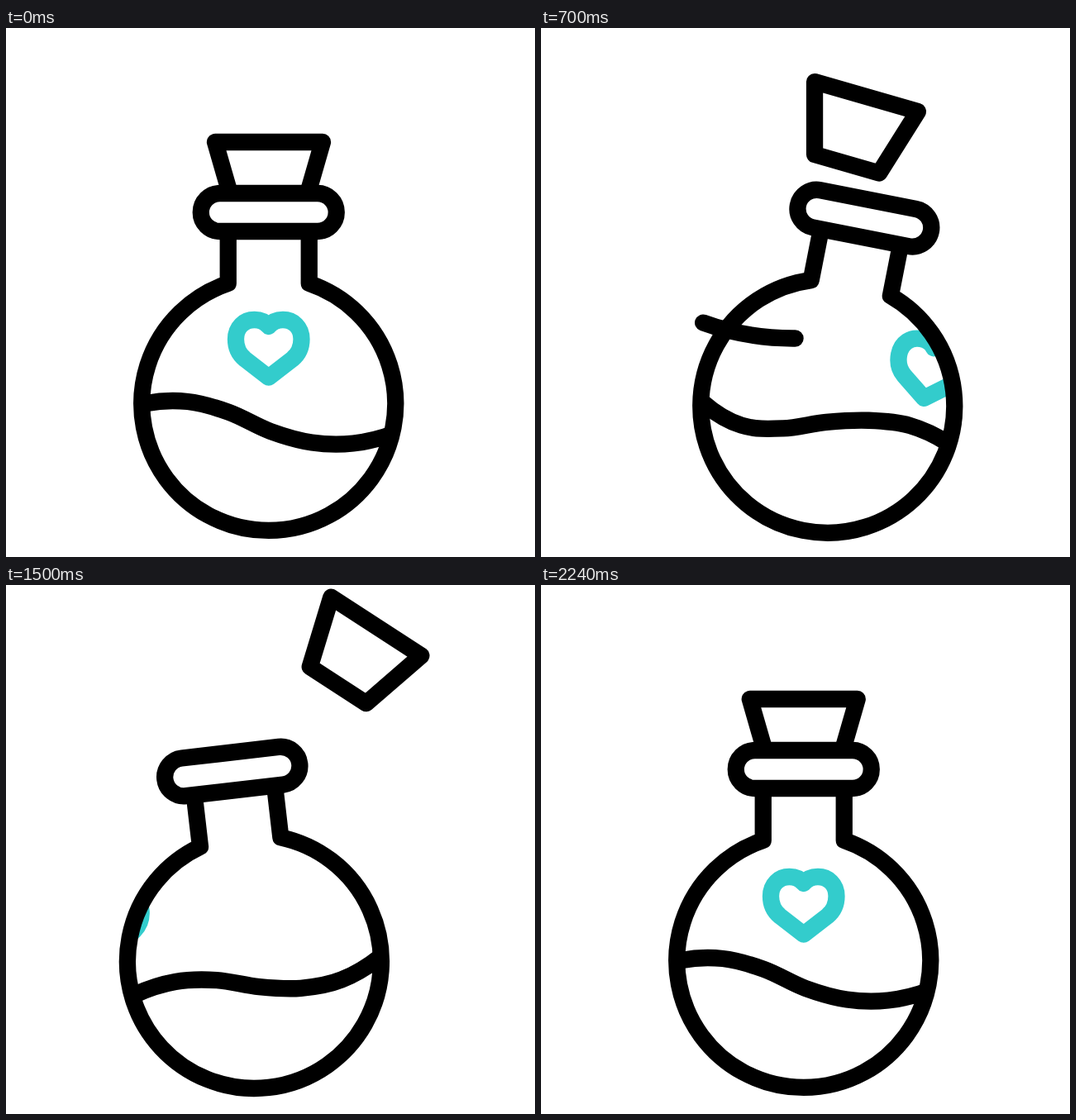
Recreate the animation shown at these times as an HTML page. Size 640 px wide and 640 px high, loop 2.4 s.

```html
<!DOCTYPE html>
<html lang="en">
<head>
<meta charset="utf-8">
<title>Love potion</title>
<style>
  html, body { margin: 0; width: 100%; height: 100%; overflow: hidden; background: #fff; }
  svg { display: block; width: 100%; height: 100%; }
  .ink { fill: none; stroke: #000; stroke-width: 20.3; stroke-linecap: round; stroke-linejoin: round; }
  .solid { fill: #fff; }
  .love { stroke: #33cccc; }
</style>
</head>
<body>
<svg viewBox="0 0 640 640">
  <defs>
    <clipPath id="inside"><circle cx="317.75" cy="454.5" r="153.5"/></clipPath>
  </defs>
  <path id="cork" class="ink" d="M-65-42.3H65L40.6 42.3H-40.6Z"/>
  <g id="flask">
    <g clip-path="url(#inside)">
      <path id="heart" class="ink love" d="M317.75 422.7L289 400.5C281 394 278 386 278 376.500C278 362 288 353 300.500 353C308 353 314 356 317.75 361C321.500 356 327.500 353 335 353C347.500 353 357.500 362 357.500 376.500C357.500 386 354.500 394 346.500 400.500Z"/>
      <path id="wave" class="ink" style="stroke-linecap:square"/>
    </g>
    <path class="ink" style="stroke-linecap:butt" d="M268.75 246V309A153.500 153.500 0 1 0 366.75 309V246"/>
    <rect class="ink solid" x="235.75" y="200" width="164" height="46" rx="23"/>
  </g>
  <path id="swoosh" class="ink" d="M99 300C150 343 220 376 307 375.500C355 375.500 400 370 437 360"/>
  <path class="ink spark" d="M224 157L212 140Q207 133 168 133"/>
  <path class="ink spark" d="M204 189L138 175"/>
  <path class="ink spark" d="M208 226L152 261"/>
</svg>
<script>
  const LOOP = 2400, STEP = 20;
  const PIVOT = { x: 317.75, y: 605 };
  const CORK = { x: 318, y: 180.3 };
  const $ = id => document.getElementById(id);
  const sparks = [...document.querySelectorAll('.spark')];

  const mix = (a, b, k) => a + (b - a) * k;
  const ease = (t, from, to) => {
    const k = Math.min(1, Math.max(0, (t - from) / (to - from)));
    return k * k * (3 - 2 * k);
  };

  // Eased steps between [time, value] keys
  function swing(keys, t) {
    let v = keys[0][1];
    for (let i = 1; i < keys.length; i++) {
      v += (keys[i][1] - keys[i - 1][1]) * ease(t, keys[i - 1][0], keys[i][0]);
    }
    return v;
  }

  // Smooth monotone curve through [time, value] keys, resting at both ends
  function glide(keys, t) {
    const n = keys.length - 1;
    if (t <= keys[0][0]) return keys[0][1];
    if (t >= keys[n][0]) return keys[n][1];
    const rate = i => (keys[i + 1][1] - keys[i][1]) / (keys[i + 1][0] - keys[i][0]);
    const slope = i => {
      if (i === 0 || i === n) return 0;
      const a = rate(i - 1), b = rate(i);
      return a * b > 0 ? 2 * a * b / (a + b) : 0;
    };
    let i = 0;
    while (t > keys[i + 1][0]) i++;
    const [t0, a] = keys[i], [t1, b] = keys[i + 1];
    const w = t1 - t0, k = (t - t0) / w, q = 1 - k;
    return a * q * q * (1 + 2 * k) + b * k * k * (3 - 2 * k)
      + w * k * q * (slope(i) * q - slope(i + 1) * k);
  }

  const tilt = [[200, 0], [800, 12], [1400, -9], [1800, 6.3], [2200, 0]];
  const flight = [[200, 0], [380, 13], [700, 63.8], [900, 86], [1180, 97.7], [1300, 102.3], [1540, 107]];
  const spin = [[200, 0], [380, 2.66], [700, 16.07], [900, 22.3], [1180, 28.7], [1300, 30.9], [1540, 33.1]];

  // Liquid heights at evenly spaced x, one row per slosh
  const calm = [454, 452, 465, 488, 501.5, 502.5, 490.5];
  const slosh = [
    [200, calm],
    [700, [480, 497.5, 491.5, 474, 462, 458.5, 471]],
    [1200, [442, 443.5, 462, 488.5, 506, 511.5, 501.5]],
    [1700, [497, 481, 477, 484, 486, 476, 447]],
    [2200, calm]
  ];

  function wavePath(t) {
    const y = calm.map((_, i) => swing(slosh.map(([at, row]) => [at, row[i]]), t));
    const n = y.length - 1, gap = 50;
    const slope = i =>
      i === 0 ? (4 * y[1] - 3 * y[0] - y[2]) / 2 :
      i === n ? (3 * y[n] - 4 * y[n - 1] + y[n - 2]) / 2 :
      (y[i + 1] - y[i - 1]) / 2;
    let d = `M170 ${y[0]}`;
    for (let i = 0; i < n; i++) {
      const x = 170 + i * gap;
      d += `C${x + gap / 3} ${y[i] + slope(i) / 3} ${x + gap * 2 / 3} ${y[i + 1] - slope(i + 1) / 3} ${x + gap} ${y[i + 1]}`;
    }
    return d;
  }

  function trim(path, tail, head) {
    const len = path.getTotalLength(), part = (head - tail) * len;
    path.style.display = part > 0.5 ? '' : 'none';
    path.setAttribute('stroke-dasharray', `${Math.max(part, 0)} 2000`);
    path.setAttribute('stroke-dashoffset', -tail * len);
  }

  function corkPose(t, angle) {
    const d = glide(flight, t), rad = angle * Math.PI / 180;
    const arm = PIVOT.y - CORK.y, back = ease(t, 1540, 1800);
    return {
      x: mix(CORK.x + d, PIVOT.x + arm * Math.sin(rad), back),
      y: mix(CORK.y - d * 0.887, PIVOT.y - arm * Math.cos(rad), back),
      a: mix(glide(spin, t), angle, back)
    };
  }

  function draw(t) {
    const angle = swing(tilt, t);
    $('flask').setAttribute('transform', `rotate(${angle} ${PIVOT.x} ${PIVOT.y})`);

    const c = corkPose(t, angle);
    $('cork').setAttribute('transform', `translate(${c.x} ${c.y}) rotate(${c.a})`);

    // The heart leaves on the right and comes back from the left
    const dx = t < 1200 ? 193 * ease(t, 200, 1100) : -193 * (1 - ease(t, 1300, 2200));
    $('heart').setAttribute('transform', `translate(${dx} 0)`);
    $('wave').setAttribute('d', wavePath(t));

    trim($('swoosh'), ease(t, 460, 1100), ease(t, 262, 1004));
    for (const s of sparks) trim(s, ease(t, 1920, 2200), ease(t, 1820, 2083));
  }

  const start = performance.now();
  function tick() {
    const t = (performance.now() - start) % LOOP;
    draw(t - t % STEP);
    requestAnimationFrame(tick);
  }
  draw(0);
  requestAnimationFrame(tick);
</script>
</body>
</html>
```
